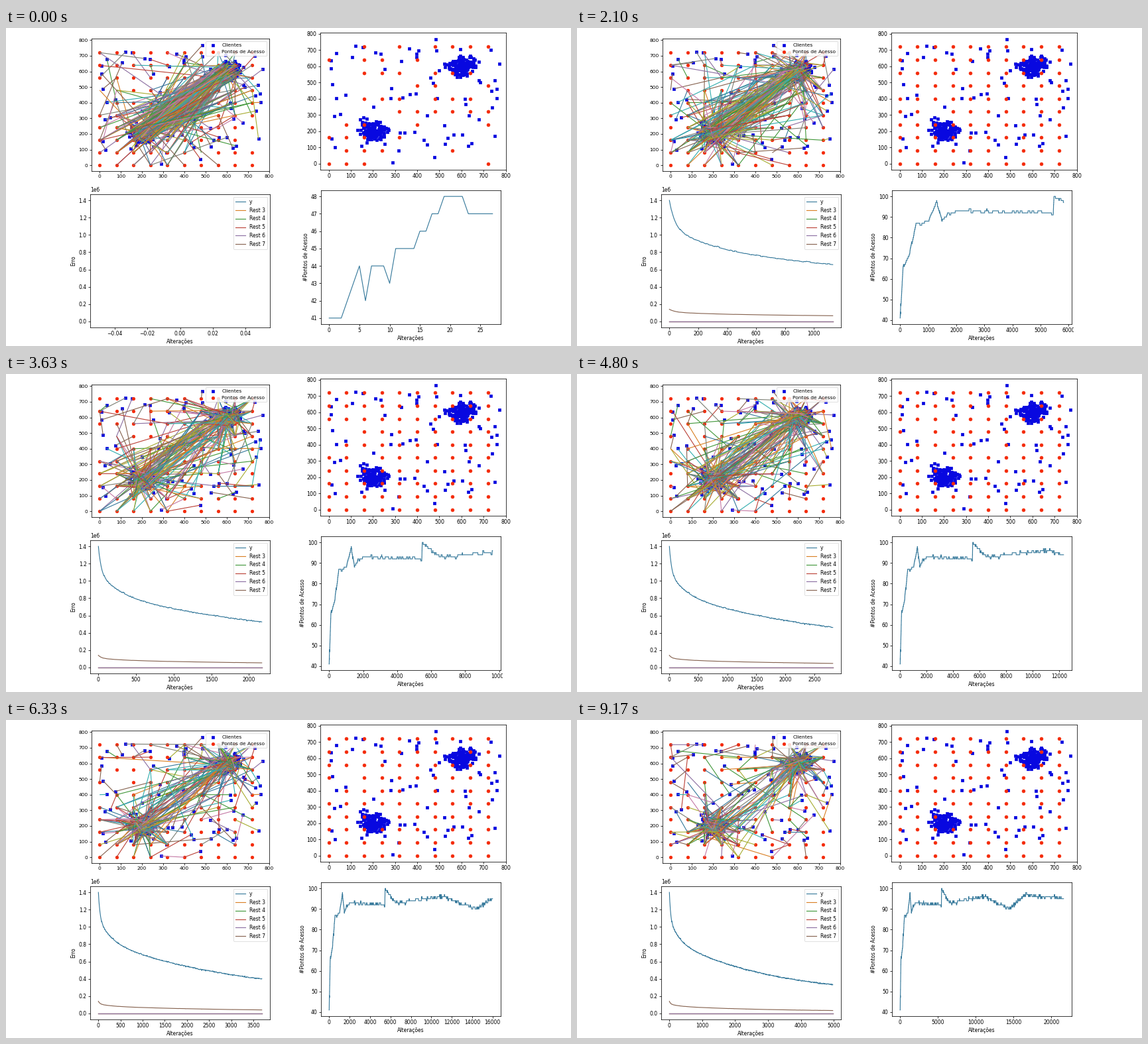
A matplotlib script for the animation above (9.26 s loop, 852 px wide and 480 px high).

```python
import numpy as np
import matplotlib.pyplot as plt
from matplotlib.animation import FuncAnimation
from matplotlib.collections import LineCollection
from matplotlib.patches import Rectangle

W, H, DPI = 852, 480, 100
LOOP, FRAMES = 9260, 232
STEP = LOOP / FRAMES
BLUE, RED = "#0808e0", "#f42a0a"
# Default colour cycle, a little faded
PALETTE = 0.72 * np.array(plt.get_cmap("tab10").colors) + 0.28 * np.array([0.45, 0.5, 0.35])
rng = np.random.default_rng(7)

# Key points of progress: seconds, rows in the error log, rows in the count log
PROGRESS = np.array([(0.13, 0, 27), (2.1, 1120, 5780), (3.63, 2168, 9610),
                     (4.8, 2802, 12260), (6.33, 3690, 16000),
                     (6.47, 3690, 16000), (8.13, 4652, 20000),
                     (9.17, 4972, 21600)])
ERROR_ROWS, COUNT_ROWS = PROGRESS[-1, 1:].astype(int)

# Key points of the number of access points
COUNT_KEYS = np.array([
    (0, 41), (2, 41), (5, 44), (6, 42), (7, 44), (9, 44), (10, 43), (11, 45),
    (14, 45), (19, 48), (22, 48), (23, 47), (27, 47), (105, 66), (330, 72),
    (560, 86), (1000, 88), (1300, 97), (1480, 89), (2000, 93), (5450, 92),
    (5480, 100), (5800, 98), (6500, 93), (11000, 96), (14400, 90),
    (16500, 97), (21600, 95)])


def cluster(center, size, spread):
    cloud = rng.normal(0, spread, (size, 2))
    return center + cloud - cloud.mean(axis=0)


def held_noise(size, hold, amount):
    return np.repeat(rng.normal(0, amount, size // hold + 1), hold)[:size]


# Clients: scattered ones plus two dense groups
SCATTERED, GROUP = 70, 170
clients = np.vstack([rng.uniform(5, 775, (SCATTERED, 2)),
                     cluster((200, 200), GROUP, 29),
                     cluster((600, 600), GROUP, 29)])
kind = np.repeat([0, 1, 2], [SCATTERED, GROUP, GROUP])
total = len(clients)
mix = rng.permutation(total)
clients, kind = clients[mix], kind[mix]

# Access points on a 10 by 10 grid, index = 10 * column + row
grid = np.array([(80 * c, 80 * r) for c in range(10) for r in range(10)])
order = rng.permutation(100)

# Links: every client keeps near and far choices and walks through them
EPOCHS = 16
dist = np.linalg.norm(clients[:, None] - grid[None], axis=2)
ranked = np.argsort(dist, axis=1)


def by_rank(scale):
    rank = np.minimum(rng.exponential(scale, (total, EPOCHS)).astype(int), 99)
    return np.take_along_axis(ranked, rank, axis=1)


def snapped(center, spread):
    cell = np.rint(rng.normal(center, spread, (total, EPOCHS, 2)) / 80)
    cell = np.clip(cell, 0, 9).astype(int)
    return 10 * cell[..., 0] + cell[..., 1]


near = by_rank(np.linspace(20, 8, EPOCHS))
far = np.choose(kind[:, None], [by_rank(25), snapped((530, 490), 85),
                                snapped((170, 190), 95)])
phase = rng.random(total)
patience = rng.random(total)

# Error: a slow decay with two quick ones on top
error_x = np.arange(ERROR_ROWS + 1)
error = (0.2 + 0.65 * np.exp(-error_x / 3100) + 0.25 * np.exp(-error_x / 270)
         + 0.3 * np.exp(-error_x / 35))
error += held_noise(len(error), 15, 0.003)
error *= 1.4e6 / error[0]

count_x = np.arange(COUNT_ROWS + 1)
count = np.interp(count_x, *COUNT_KEYS.T)
count += held_noise(len(count), 70, 0.45) * (count_x > 70)
count = np.clip(np.rint(count), 41, 100).astype(int)

fig = plt.figure(figsize=(W / DPI, H / DPI), dpi=DPI, facecolor="white")


def panel(left, top, right, bottom, xlabel=None, ylabel=None):
    ax = fig.add_axes([left / W, 1 - bottom / H,
                       (right - left) / W, (bottom - top) / H])
    s = (right - left) / 496
    ax.set_prop_cycle(color=PALETTE)
    ax.tick_params(labelsize=10 * s, length=3.5 * s, width=0.55, pad=3.5 * s)
    for spine in ax.spines.values():
        spine.set_linewidth(0.55)
    if xlabel:
        ax.set_xlabel(xlabel, fontsize=10 * s, labelpad=4 * s)
        ax.set_ylabel(ylabel, fontsize=10 * s, labelpad=4 * s)
    ax.yaxis.get_offset_text().set_size(10 * s)
    return ax, s


def map_panel(*box):
    ax, s = panel(*box)
    ax.set(xlim=(-38.2, 801.4), ylim=(-38.5, 809))
    dots = dict(ls="", ms=6 * s, mew=s)
    ax.plot(*clients.T, marker="s", color=BLUE, zorder=1, label="Clientes", **dots)
    points, = ax.plot([], [], marker="o", color=RED, zorder=1.5,
                      label="Pontos de Acesso", **dots)
    return ax, s, points


def add_legend(ax, s):
    box = ax.legend(loc="upper right", fontsize=10 * s, numpoints=1)
    box.get_frame().set_linewidth(s)


web_ax, s, web_points = map_panel(129, 16.2, 397, 216.2)
add_legend(web_ax, s)
links = LineCollection([], linewidths=1.5 * s, zorder=2,
                       colors=PALETTE[np.arange(total) % 10])
web_ax.add_collection(links, autolim=False)

map_ax, s, map_points = map_panel(474, 6.6, 754, 214)

error_ax, s = panel(127, 251, 398, 452, "Alterações", "Erro")
error_ax.set_ylim(-0.07e6, 1.47e6)
error_line, = error_ax.plot([], [], lw=1.5 * s, label="y")
rest = [error_ax.plot([], [], lw=1.5 * s, label=f"Rest {k}")[0]
        for k in range(3, 8)]
add_legend(error_ax, s)

count_ax, s = panel(475, 245, 746, 447, "Alterações", "#Pontos de Acesso")
count_line, = count_ax.plot([], [], lw=1.5 * s)
# The lower right picture is cropped just past its axes
fig.add_artist(Rectangle((749 / W, 0), 1 - 749 / W, 1 - 243 / H,
                         color="white", zorder=10))


def visible(number, turn):
    ranking = np.concatenate([order[:90], np.roll(order[90:], turn)])
    return grid[ranking[:number]].T


def draw_links(rows):
    epoch = np.floor(rows / ERROR_ROWS * (EPOCHS - 2) + phase).astype(int)
    who = np.arange(total)
    is_far = patience < 0.95 * error[rows] / error[0] - 0.15
    goal = np.where(is_far, far[who, epoch], near[who, epoch])
    links.set_segments(np.stack([clients, grid[goal]], axis=1))


def update(k):
    t = (k + 1) * STEP / 1000
    seconds, error_keys, count_keys = PROGRESS.T
    rows = int(np.interp(t, seconds, error_keys))
    made = int(np.interp(t, seconds, count_keys))

    draw_links(rows)
    number, turn = count[made], made // 4000
    map_points.set_data(*visible(number, turn))
    web_points.set_data(*visible(max(number, 94), turn))

    x, y = error_x[:rows + 1], error[:rows + 1]
    error_line.set_data(x, y)
    for line in rest[:-1]:
        line.set_data([0, rows], [0, 0])
    rest[-1].set_data(x, y / 10)
    pad = 0.05 * rows
    error_ax.set_xlim(-pad or -0.055, rows + pad or 0.055)

    seen = count[:made + 1]
    count_line.set_data(count_x[:made + 1], seen)
    count_ax.set_xlim(-0.05 * made, 1.05 * made)
    pad = 0.05 * (seen.max() - 41)
    count_ax.set_ylim(41 - pad, seen.max() + pad)


anim = FuncAnimation(fig, update, frames=FRAMES, interval=STEP, repeat=True,
                     repeat_delay=0, blit=False, cache_frame_data=False)
plt.show()
```
